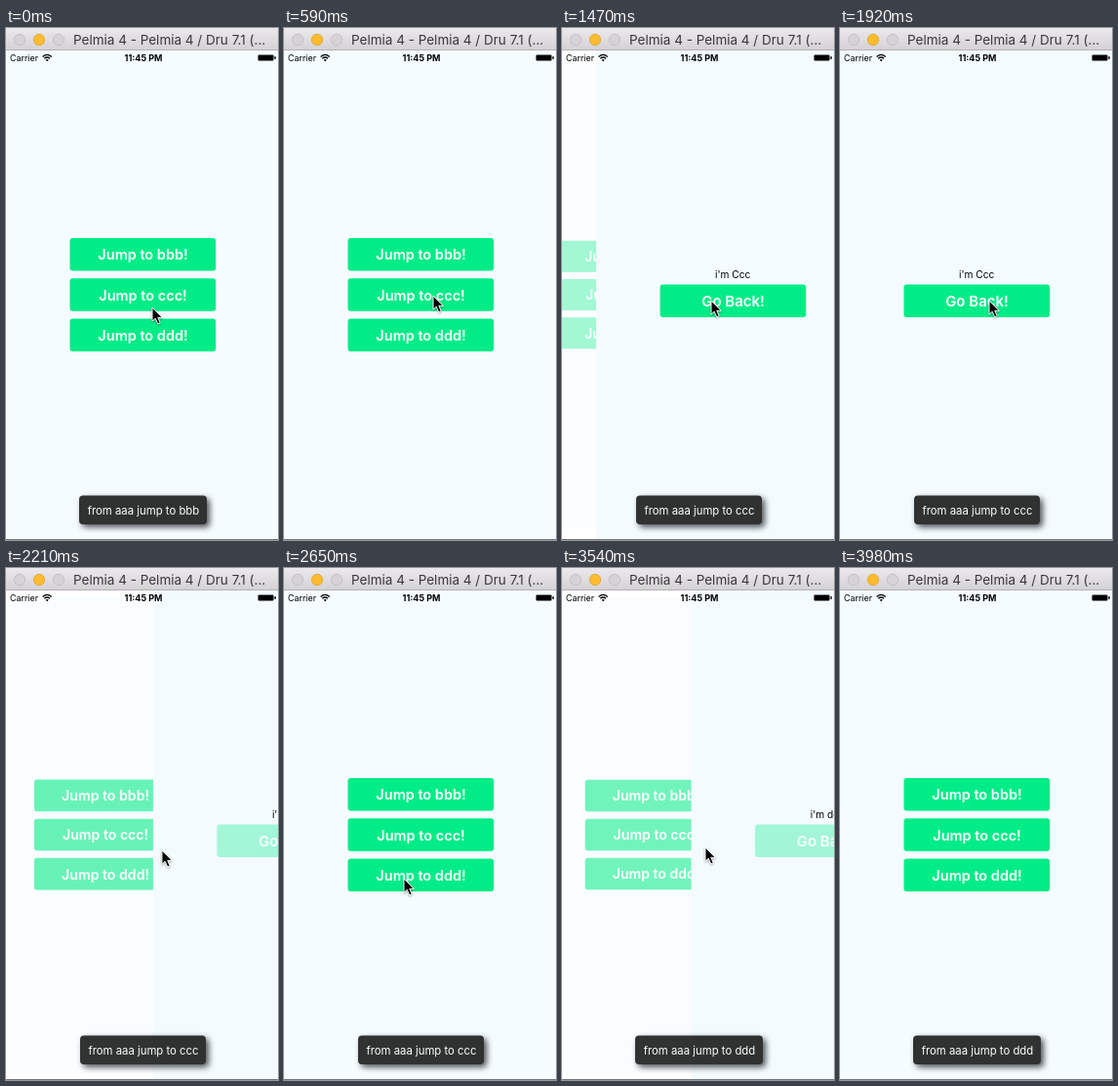
These frames come from a looping animation (279 by 524 pixels, 4.13 s). An HTML page:

```html
<!DOCTYPE html>
<html lang="en">
<head>
<meta charset="utf-8">
<title>Page jumps</title>
<style>
  html, body { margin: 0; width: 100%; height: 100%; overflow: hidden; background: #fff; }
  svg { display: block; width: 100vw; height: 100vh; font-family: Inter, Roboto, sans-serif; }
  .mid { text-anchor: middle; }
  .btn rect { fill: #00ec87; }
  .btn text { fill: #fff; font-weight: 600; text-anchor: middle; }
  .toast { filter: drop-shadow(3px 3px 3.2px rgba(0, 0, 0, .85)); }
  .toast text { fill: #fff; font-size: 11.35px; text-anchor: middle; }
</style>
</head>
<body>
<svg viewBox="0 0 279 524">
  <defs>
    <linearGradient id="bar" x2="0" y2="1">
      <stop stop-color="#ebe9eb"/>
      <stop offset="1" stop-color="#d3d1d3"/>
    </linearGradient>
  </defs>
  <rect width="279" height="524" fill="#fff"/>
  <g id="home"><rect y="23" width="279" height="501" fill="#f5fcff"/></g>
  <g id="page">
    <rect y="23" width="279" height="501" fill="#f3fbff"/>
    <text id="label" class="mid" x="140.2" y="256" font-size="10.2"></text>
  </g>
  <g id="toasts"></g>
  <rect y="523" width="279" height="1" fill="#777"/>

  <g id="status">
    <text x="4" y="34" font-size="8.9">Carrier</text>
    <g fill="none" stroke="#000" stroke-width="1.3">
      <path d="M37.6 29.4q4.6-4 9.2 0M39.3 31.2q2.9-2.4 5.8 0"/>
    </g>
    <path d="M40.6 32.6q1.6-1.2 3.2 0l-1.6 1.7z"/>
    <text class="mid" x="141" y="34" font-size="9" font-weight="700">11:45 PM</text>
    <rect x="258.5" y="27.5" width="16" height="6" rx="1"/>
    <rect x="275.3" y="29" width="1.5" height="3" rx=".7"/>
  </g>
  <g id="window">
    <rect width="279" height="23" fill="url(#bar)"/>
    <rect y="22" width="279" height="1" fill="#b5b3b5"/>
    <circle cx="14" cy="12" r="5.7" fill="#d5d3d5" stroke="#bfbdbf" stroke-width=".8"/>
    <circle cx="34" cy="12" r="5.7" fill="#fdbc2e" stroke="#e0a030" stroke-width=".8"/>
    <circle cx="54" cy="12" r="5.7" fill="#d5d3d5" stroke="#bfbdbf" stroke-width=".8"/>
    <text x="69" y="17" font-size="13.5" fill="#3a383a">Pelmia 4 - Pelmia 4 / Dru 7.1 (...</text>
  </g>
  <path id="cursor" d="M0 0v14.2l3.2-3 2.5 5.6 2.5-1.1-2.4-5.4h4.6z"
        stroke="#fff" stroke-width="1" style="filter: drop-shadow(0 1px 1px rgba(0,0,0,.35))"/>
</svg>
<script>
const LOOP = 4130, STEP = 147.5, LAST = 27;
const PUSH = [1331, 2862], POP = [2140, 3476];
const $ = id => document.getElementById(id);

function add(parent, tag, attrs, text) {
  const el = document.createElementNS('http://www.w3.org/2000/svg', tag);
  for (const key in attrs) el.setAttribute(key, attrs[key]);
  if (text) el.textContent = text;
  return parent.appendChild(el);
}

function button(parent, y, text, size) {
  const g = add(parent, 'g', { class: 'btn' });
  add(g, 'rect', { x: 65.5, y, width: 149.7, height: 33.5, rx: 3 });
  add(g, 'text', { x: 140.5, y: y + 22.4, 'font-size': size }, text);
  return g;
}

function toast(name, width) {
  const g = add($('toasts'), 'g', { class: 'toast' });
  add(g, 'rect', { x: 140.5 - width / 2, y: 478.5, width, height: 29.5, rx: 4 });
  add(g, 'text', { x: 141, y: 497.6 }, 'from aaa jump to ' + name);
  return g;
}

const jumps = ['bbb', 'ccc', 'ddd'].map((name, i) =>
  button($('home'), 215 + i * 41.2, `Jump to ${name}!`, 14.5));
const back = button($('page'), 262.6, 'Go Back!', 15);

// Each toast: element, fade-in start, fade-out start
const toasts = [
  [toast('bbb', 131), -500, 270],
  [toast('ccc', 129), PUSH[0], 3190],
  [toast('ddd', 131), PUSH[1], 9999],
];

// Pointer path: time, x, y
const path = [
  [0, 150, 286], [300, 156, 253], [590, 153, 274], [740, 153, 279],
  [2065, 153, 279], [2212, 160, 289], [2500, 126, 316], [2655, 123, 318],
  [2810, 123, 319], [2950, 136, 296], [3097, 146, 278], [3476, 146, 278],
  [3540, 147, 286], [3835, 153, 505], [3960, 150, 545],
];

const clamp = v => Math.max(0, Math.min(1, v));

function pointer(t) {
  const i = path.findIndex(p => p[0] > t);
  if (i < 0) return path[path.length - 1].slice(1);
  const [a, b] = [path[i - 1], path[i]];
  const k = (t - a[0]) / (b[0] - a[0]);
  return [a[1] + (b[1] - a[1]) * k, a[2] + (b[2] - a[2]) * k];
}

// Critically damped spring from 0 to 1
function spring(ms) {
  const x = Math.max(0, ms) * 0.025;
  return 1 - (1 + x) * Math.exp(-x);
}

// Touch feedback: dims on press, restored after release
function touch(t, from, to, first, then) {
  if (t < from || t > to) return 1;
  return t < from + 120 ? first : then;
}

function draw(t) {
  const n = t < 2700 ? 0 : 1;
  let p = spring(t - PUSH[n]) - spring(t - POP[n]);
  if (p < 0.004) p = 0;

  $('home').setAttribute('transform',
    `translate(${139.5 - 83.7 * p} 273.5) scale(${1 - 0.054 * p}) translate(-139.5 -273.5)`);
  $('home').setAttribute('opacity', 1 - 0.7 * p ** 0.7);
  $('page').setAttribute('transform', `translate(${279 * (1 - p)} 0)`);
  $('label').textContent = n ? "i'm ddd" : "i'm Ccc";

  jumps[1].setAttribute('opacity', touch(t, 1170, 1400, 0.42, 0.25));
  jumps[2].setAttribute('opacity', touch(t, 2790, 2900, 0.42, 0.25));
  back.setAttribute('opacity',
    Math.min(touch(t, 2055, 2450, 0.25, 0.33), touch(t, 3385, 3750, 0.25, 0.33)));

  for (const [el, start, end] of toasts) {
    const fade = clamp((t - start) / 140) * (1 - clamp((t - end) / 180));
    el.setAttribute('opacity', 0.8 * fade);
  }
  $('cursor').setAttribute('transform', `translate(${pointer(t)})`);
}

function tick() {
  const t = performance.now() % LOOP;
  draw(Math.min(LAST, Math.floor((t + 10) / STEP)) * STEP);
  requestAnimationFrame(tick);
}
tick();
</script>
</body>
</html>
```
